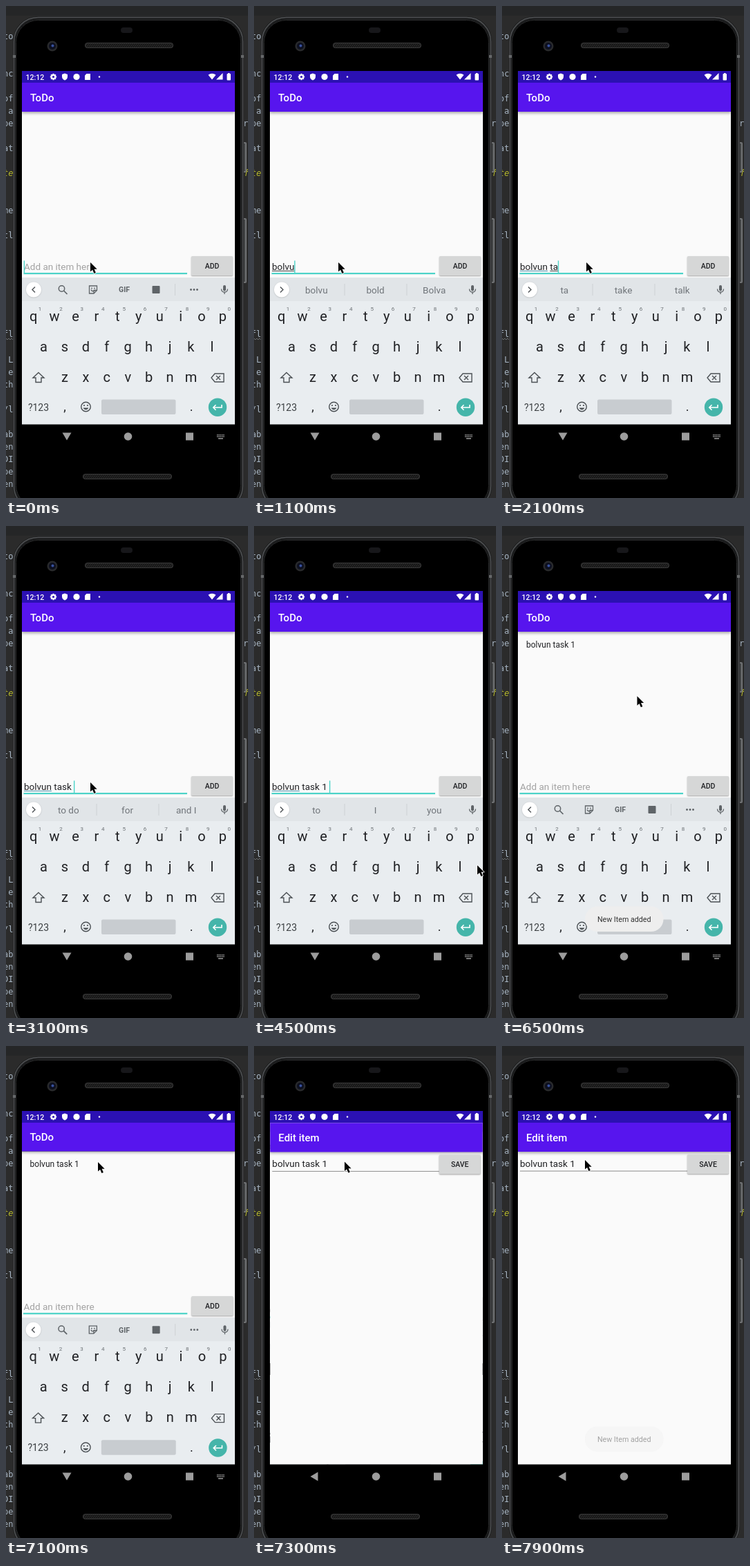
Animation, 350 px wide and 712 px high, one loop 8 s. Source, as an HTML page with a canvas:

```html
<!DOCTYPE html>
<html lang="en">
<head>
<meta charset="utf-8">
<title>ToDo demo</title>
<style>
html, body { margin: 0; width: 100%; height: 100%; overflow: hidden; background: #2b2b2b; }
canvas { display: block; width: 350px; height: 712px; }
</style>
</head>
<body>
<canvas id="stage"></canvas>
<script>
const LOOP = 8000, W = 350, H = 712;
const canvas = document.getElementById('stage');
const dpr = window.devicePixelRatio || 1;
canvas.width = W * dpr;
canvas.height = H * dpr;
const c = canvas.getContext('2d');
const SANS = 'Roboto, "Noto Sans", sans-serif';
const MONO = '"DejaVu Sans Mono", "Liberation Mono", monospace';
const TEAL = '#4cd3c8', INK = '#202124', ICON = '#5f6468';
const NAME = 'bolvun', TASK = NAME + ' task 1';

// time, typed text, suggestions
const typing = [
  [300, 'b', 'b|be|but'],
  [500, 'bo', 'bo|box|both'],
  [700, 'bol', 'bol|bold|bolt'],
  [900, 'bolv', 'bolv|bold|bolt'],
  [1000, 'bolvu', 'bolvu|bold|Bolva'],
  [1200, NAME, NAME + '|bold|Bolva'],
  [1400, NAME + ' ', 'is|and|I'],
  [1900, NAME + ' t', 't|to|the'],
  [2100, NAME + ' ta', 'ta|take|talk'],
  [2300, NAME + ' tas', 'tas|task|taste'],
  [2500, NAME + ' task', 'task|tasks|talk'],
  [2900, NAME + ' task ', 'to do|for|and I'],
  [3200, TASK, '1|1st|10'],
  [3400, TASK + ' ', 'to|I|you']
];
const ADDED = 5600, TOOLS_BACK = 6200, OPEN = 7080, OPEN_MS = 400;

const pointerPath = [
  [0, 122, 371], [4200, 122, 371], [4500, 323, 491], [5200, 303, 381],
  [6000, 303, 381], [6850, 133, 168], [7100, 133, 168], [7900, 120, 165], [8000, 120, 165]
];

const clamp = v => Math.max(0, Math.min(1, v));
const ramp = (t, a, b) => clamp((t - a) / (b - a));
const smooth = p => p * p * (3 - 2 * p);
const openEase = p => p < 1 / 6 ? 0.4 * (6 * p) ** 2.5 : 1 - 0.6 * (1 - (p - 1 / 6) * 1.2) ** 6;

function rect(x, y, w, h, color) {
  c.fillStyle = color;
  c.fillRect(x, y, w, h);
}
function round(x, y, w, h, r, color) {
  c.beginPath();
  c.roundRect(x, y, w, h, r);
  c.fillStyle = color;
  c.fill();
}
function disc(x, y, r, color) {
  c.beginPath();
  c.arc(x, y, r, 0, Math.PI * 2);
  c.fillStyle = color;
  c.fill();
}
function ring(x, y, r, color, width = 1.3) {
  c.beginPath();
  c.arc(x, y, r, 0, Math.PI * 2);
  c.strokeStyle = color;
  c.lineWidth = width;
  c.stroke();
}
function text(s, x, y, size, color, weight = 400, align = 'left', family = SANS) {
  c.font = `${weight} ${size}px ${family}`;
  c.textAlign = align;
  c.fillStyle = color;
  c.fillText(s, x, y);
}
function path(d, x, y, color, width = 0) {
  const p = new Path2D(d);
  c.save();
  c.translate(x, y);
  if (width) {
    c.strokeStyle = color;
    c.lineWidth = width;
    c.stroke(p);
  } else {
    c.fillStyle = color;
    c.fill(p);
  }
  c.restore();
}
function shadowed(blur, dy, alpha, draw) {
  c.save();
  c.shadowColor = `rgba(0,0,0,${alpha})`;
  c.shadowBlur = blur * dpr;
  c.shadowOffsetY = dy * dpr;
  draw();
  c.restore();
}

function editor() {
  rect(0, 0, W, H, '#2b2b2b');
  rect(0, 0, W, 14, '#252627');
  const lines = [
    ['to', 48], ['nc', 102], ['of', 138], [' a', 156], ['pe', 174], ['at', 210], ['me', 300],
    ['tl', 336], ['fl', 479], [' L', 516], [' e', 534], ['th', 552], ['/l', 588],
    ['ab', 624], ['en', 642], ['DI', 660], ['pe', 678], ['en', 696]
  ];
  for (const [s, y] of lines) text(s, -4, y, 12, '#a9b7c6', 400, 'left', MONO);
  text('te', -4, 246, 12, '#b5b82c', 'italic 400', 'left', MONO);
  text('ro', 343, 174, 12, '#a9b7c6', 400, 'left', MONO);
  text('f', 344, 246, 12, '#b5b82c', 'italic 400', 'left', MONO);
  path('M0 0l2 2 2-2 2 2 2-2 2 2', 0, 481, '#7d8084', 0.8);
}

function grille(x, y, w) {
  round(x, y, w, 8, 4, '#282828');
  c.save();
  c.beginPath();
  c.roundRect(x, y, w, 8, 4);
  c.clip();
  c.strokeStyle = '#0c0c0c';
  c.lineWidth = 1;
  c.beginPath();
  for (let i = -6; i < w; i += 3) {
    c.moveTo(x + i, y + 8);
    c.lineTo(x + i + 6, y);
  }
  c.stroke();
  c.restore();
  c.beginPath();
  c.roundRect(x + 0.5, y + 0.5, w - 1, 7, 3.5);
  c.strokeStyle = '#3a3a3a';
  c.stroke();
}

function phone() {
  round(342, 197, 6, 44, 2, '#707274');
  round(342, 307, 6, 94, 2, '#707274');
  rect(343, 199, 3, 40, '#454749');
  rect(343, 309, 3, 90, '#454749');
  round(10, 15, 334, 716, 36, '#1c1d1e');
  c.beginPath();
  c.roundRect(11.5, 16.5, 331, 713, 35);
  c.strokeStyle = '#505254';
  c.lineWidth = 1.5;
  c.stroke();
  round(14, 20, 326, 706, 32, '#000');
  c.beginPath();
  c.roundRect(14.5, 20.5, 325, 705, 32);
  c.strokeStyle = '#2c2d2e';
  c.lineWidth = 1;
  c.stroke();
  rect(10, 71, 4, 4, '#66686a');
  rect(340, 71, 4, 4, '#66686a');
  round(166, 31, 17, 8, 4, '#17171a');
  disc(67, 58, 7.5, '#292a2c');
  disc(67, 58, 5, '#0d1020');
  disc(67.5, 57.5, 2, '#37509c');
  grille(114, 53, 128);
  grille(111, 677, 129);
}

function statusBar() {
  rect(23, 94, 308, 17, '#2b11b2');
  text('12:12', 28.5, 106.5, 10.5, '#fff', 500);
  for (let i = 0; i < 4; i++) {
    c.save();
    c.translate(68.5, 102.5);
    c.rotate(i * Math.PI / 4);
    rect(-1.1, -4.7, 2.2, 9.4, '#fff');
    c.restore();
  }
  disc(68.5, 102.5, 3.6, '#fff');
  disc(68.5, 102.5, 1.6, '#2b11b2');
  path('M0-5L4-3.4V0C4 2.5 2 4.4 0 5C-2 4.4-4 2.5-4 0V-3.4Z', 85, 102.5, '#fff');
  disc(102, 102.5, 4.6, '#fff');
  path('M-1.5-4.5H4V4.5H-4V-2Z', 118, 102.5, '#fff');
  disc(135, 102.5, 1.2, '#fff');
  path('M0 4.5L-5.5-2.2C-2.5-5 2.5-5 5.5-2.2Z', 298, 102, '#fff');
  path('M4.5-5V4.5H-5Z', 309, 102, '#fff');
  round(319.5, 98, 5.5, 9.5, 1, '#fff');
  rect(321, 97, 2.5, 1.5, '#fff');
}

function appBar(title) {
  shadowed(4, 1.5, 0.35, () => rect(23, 111, 308, 42, '#5715ee'));
  text(title, 35, 138, 15, '#fff', 500);
}

function button(label, y, pressed = 0) {
  shadowed(2, 1, 0.35, () => round(268, y, 60, 28, 1.5, '#d6d7d7'));
  if (pressed) round(268, y, 60, 28, 1.5, `rgba(0,0,0,${0.14 * pressed})`);
  text(label, 298, y + 18, 10.5, INK, 500, 'center');
}

function inputRow(t) {
  let typed = '', last = -410;
  for (const [at, s] of typing) if (t >= at) [last, typed] = [at, s];
  if (t >= ADDED) [last, typed] = [ADDED, ''];
  text(typed || 'Add an item here', 26, 382, 13.5, typed ? INK : '#a2a2a2');
  const width = s => c.measureText(s).width;
  const caret = 26 + width(typed);
  if (typed && !typed.endsWith(' ')) {
    const start = typed.lastIndexOf(' ') + 1;
    const x = 26 + width(typed.slice(0, start));
    rect(x, 383, caret - x, 1, '#444');
  }
  if (typed.length > NAME.length) rect(26, 383, width(NAME), 1, '#4f93ad');
  rect(25.5, 386, 236.5, 2.2, TEAL);
  if ((t - last) % 1000 < 500) rect(caret - 0.3, 368.5, 1.4, 17.5, TEAL);
  button('ADD', 362, ramp(t, 5400, 5480) * (1 - ramp(t, 5600, 5750)));
}

function mic(x, y) {
  round(x - 2, y - 6.5, 4, 8.5, 2, ICON);
  path('M-4.5-1C-4.5 5.2 4.5 5.2 4.5-1M0 3.6V6.5', x, y, ICON, 1.3);
}

function strip(t) {
  rect(23, 393, 308, 34, '#e1e5e8');
  const tools = t < typing[0][0] || t >= TOOLS_BACK;
  shadowed(2, 0.5, 0.2, () => disc(40, 410.5, 11, '#fff'));
  path(tools ? 'M2-4L-2 0L2 4' : 'M-2-4L2 0L-2 4', 40, 410.5, '#54585c', 1.5);
  mic(316, 410.5);
  if (tools) {
    ring(80.5, 409, 4.2, ICON, 1.5);
    path('M0 0L5 5', 83.5, 412, ICON, 1.7);
    path('M-5-5.5H5.5V1L1 5.5H-5.5V-5.5ZM5.5 1H1V5.5M-3 0C-2 3 2 3 3 0', 126, 410.5, ICON, 1.3);
    disc(124, 408.5, 0.9, ICON);
    disc(128, 408.5, 0.9, ICON);
    text('GIF', 171, 414.3, 10.5, ICON, 700, 'center');
    round(211.5, 405, 11, 11, 1, ICON);
    rect(244, 402, 1, 17, '#cdd1d4');
    for (const x of [267.5, 272, 276.5]) disc(x, 410.5, 1.4, ICON);
  } else if (t < ADDED) {
    const words = typing.filter(k => t >= k[0]).pop()[2].split('|');
    words.forEach((w, i) => text(w, 90.3 + 85.2 * i, 415.5, 13.5, '#70757a', 400, 'center'));
    rect(130.5, 402, 1, 17, '#cdd1d4');
    rect(220.5, 402, 1, 17, '#cdd1d4');
  }
}

function keyboard(t) {
  rect(23, 393, 308, 213, '#e9edf0');
  strip(t);
  const rows = [['qwertyuiop', 39.7, 455.5], ['asdfghjkl', 54.5, 499.5], ['zxcvbnm', 85, 543.5]];
  for (const [keys, x, y] of rows)
    [...keys].forEach((k, i) => text(k, x + i * 30.42, y, 20, INK, 400, 'center'));
  for (let i = 0; i < 10; i++)
    text((i + 1) % 10, 49 + i * 30.42, 440.5, 8, '#6a6f73', 400, 'center');
  path('M0-7.5L8 0H4V6.5H-4V0H-8Z', 47, 538, '#4b5054', 1.4);
  path('M-9 0L-4-6H9V6H-4ZM-2-3L4 3M4-3L-2 3', 306, 538, '#4b5054', 1.4);
  text('?123', 47, 585.5, 14, '#3c4043', 400, 'center');
  text(',', 85, 586, 18, INK, 400, 'center');
  ring(115.5, 580, 6.8, '#4b5054', 1.4);
  disc(113, 578, 1.1, '#4b5054');
  disc(118, 578, 1.1, '#4b5054');
  path('M-3.8 1.5C-2.5 5 2.5 5 3.8 1.5Z', 115.5, 580, '#4b5054');
  round(138, 569.5, 107.5, 21.5, 2, '#c8ccd0');
  text('.', 268, 586, 18, INK, 400, 'center');
  disc(306, 580.7, 13.2, '#45b5aa');
  path('M6-4V0H-6M-2.5-3.7L-6.2 0L-2.5 3.7', 306, 581, '#fff', 1.6);
}

function listScreen(t) {
  rect(23, 153, 308, 453, '#fafafa');
  appBar('ToDo');
  if (t >= ADDED) text(TASK, 35, 176, 12, INK);
  inputRow(t);
  keyboard(t);
}

function editScreen() {
  rect(23, 111, 308, 495, '#fafafa');
  appBar('Edit item');
  text(TASK, 26, 175, 13.5, INK);
  rect(26, 180.5, 242, 1, '#8c8c8c');
  button('SAVE', 157);
}

function scaled(s, draw) {
  c.save();
  c.translate(177, 350);
  c.scale(s, s);
  c.translate(-177, -350);
  draw();
  c.restore();
}

function toast(t) {
  const alpha = ramp(t, 5650, 5950) * (1 - ramp(t, 7700, 8050));
  const covered = t >= OPEN && t < OPEN + OPEN_MS;
  if (!alpha || covered) return;
  c.save();
  c.globalAlpha = alpha;
  round(120, 550.5, 113.5, 36.5, 18, '#eeeeee');
  text('New Item added', 176.7, 573.3, 10.7, '#333', 400, 'center');
  c.restore();
}

function navBar(t) {
  rect(23, 605.5, 308, 36, '#000');
  const grey = '#9c9c9c';
  if (t < OPEN + 100) {
    path('M-6.5-5H6.5L0 6Z', 88, 622.5, grey);
    for (let i = 0; i < 10; i++) rect(305 + (i % 5) * 2.3, 620 + Math.floor(i / 5) * 2.5, 1.5, 1.5, grey);
    rect(307, 625.2, 7, 1.5, grey);
  } else {
    path('M5-6.5V6.5L-6 0Z', 87.5, 623, grey);
  }
  disc(176.5, 623, 5.8, grey);
  rect(260, 617.5, 11, 11, grey);
}

function pointer(t) {
  const i = pointerPath.findIndex((k, n) => n && t <= k[0]);
  const [a, x0, y0] = pointerPath[i - 1], [b, x1, y1] = pointerPath[i];
  const p = smooth(ramp(t, a, b));
  const x = x0 + (x1 - x0) * p, y = y0 + (y1 - y0) * p;
  const arrow = 'M0 0V13.5L3.1 10.7L5.4 16L7.9 14.9L5.6 9.8H9.7Z';
  c.lineJoin = 'round';
  path(arrow, x, y, '#fff', 1.6);
  path(arrow, x, y, '#000');
  c.lineJoin = 'miter';
}

function draw(t) {
  c.setTransform(dpr, 0, 0, dpr, 0, 0);
  editor();
  phone();
  c.save();
  c.beginPath();
  c.rect(23, 94, 308, 546);
  c.clip();
  const p = ramp(t, OPEN, OPEN + OPEN_MS);
  const e = openEase(p);
  if (p < 1) scaled(1 + 0.15 * e, () => listScreen(t));
  if (p > 0) {
    c.globalAlpha = ramp(t, OPEN + 50, OPEN + 100);
    if (c.globalAlpha) scaled(0.85 + 0.15 * e, editScreen);
    c.globalAlpha = 1;
  }
  statusBar();
  toast(t);
  navBar(t);
  c.restore();
  pointer(t);
}

const start = performance.now();
function tick() {
  draw((performance.now() - start) % LOOP);
  requestAnimationFrame(tick);
}
tick();
</script>
</body>
</html>
```
